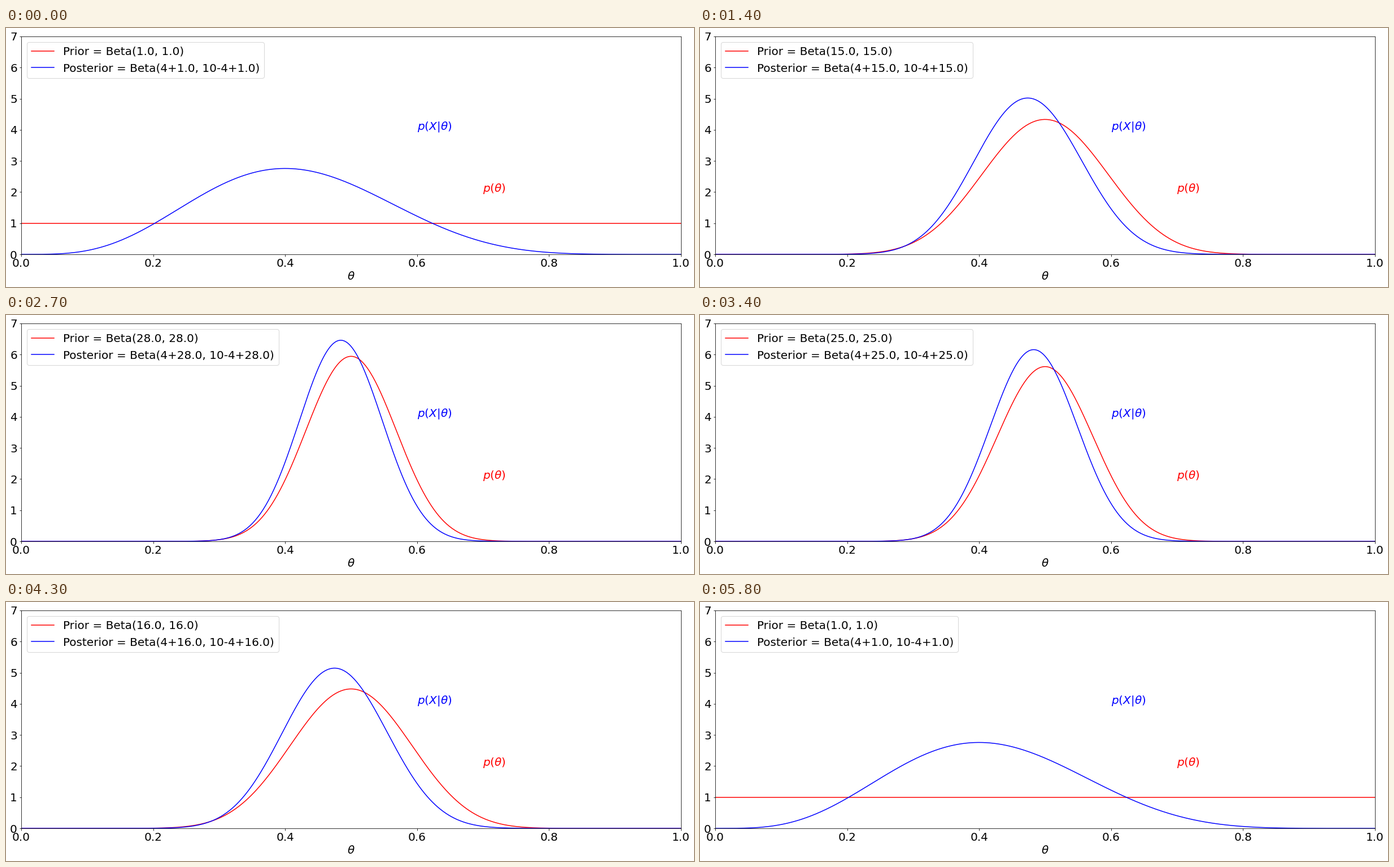
A matplotlib script that plays this animation: 1218 by 460 pixels, repeating every 5.9 s.

```python
import math

import matplotlib.pyplot as plt
import numpy as np
from matplotlib.animation import FuncAnimation

WIDTH, HEIGHT, DPI = 1218, 460, 72
LEFT, RIGHT, TOP, BOTTOM = 26.9, 1194.9, 15, 402
FRAMES, INTERVAL = 59, 100
HEADS, TOSSES = 4, 10

plt.rcParams.update({"font.family": "DejaVu Sans", "font.size": 20})

theta = np.linspace(0, 1, 500)


def beta_pdf(x, a, b):
    log_norm = math.lgamma(a + b) - math.lgamma(a) - math.lgamma(b)
    return math.exp(log_norm) * x ** (a - 1) * (1 - x) ** (b - 1)


fig = plt.figure(figsize=(WIDTH / DPI, HEIGHT / DPI), dpi=DPI, facecolor="white")
ax = fig.add_axes([LEFT / WIDTH, 1 - BOTTOM / HEIGHT,
                   (RIGHT - LEFT) / WIDTH, (BOTTOM - TOP) / HEIGHT])
ax.set(xlim=(0, 1), ylim=(0, 7), xlabel=r"$\theta$")

prior_line, = ax.plot([], [], color="red", label="Prior")
posterior_line, = ax.plot([], [], color="blue", label="Posterior")
ax.text(0.6, 4, r"$p(X|\theta)$", color="blue")
ax.text(0.7, 2, r"$p(\theta)$", color="red")
legend = ax.legend(loc="upper left")
prior_text, posterior_text = legend.get_texts()


def update(frame):
    # The prior strength climbs from 1 to 30 and back down to 1.
    a = float(min(frame + 1, FRAMES - frame))
    prior_line.set_data(theta, beta_pdf(theta, a, a))
    posterior_line.set_data(theta, beta_pdf(theta, HEADS + a, TOSSES - HEADS + a))
    prior_text.set_text(f"Prior = Beta({a}, {a})")
    posterior_text.set_text(f"Posterior = Beta({HEADS}+{a}, {TOSSES}-{HEADS}+{a})")
    return prior_line, posterior_line, legend


animation = FuncAnimation(fig, update, frames=FRAMES, interval=INTERVAL,
                          repeat=True, repeat_delay=0, blit=False)
plt.show()
```
